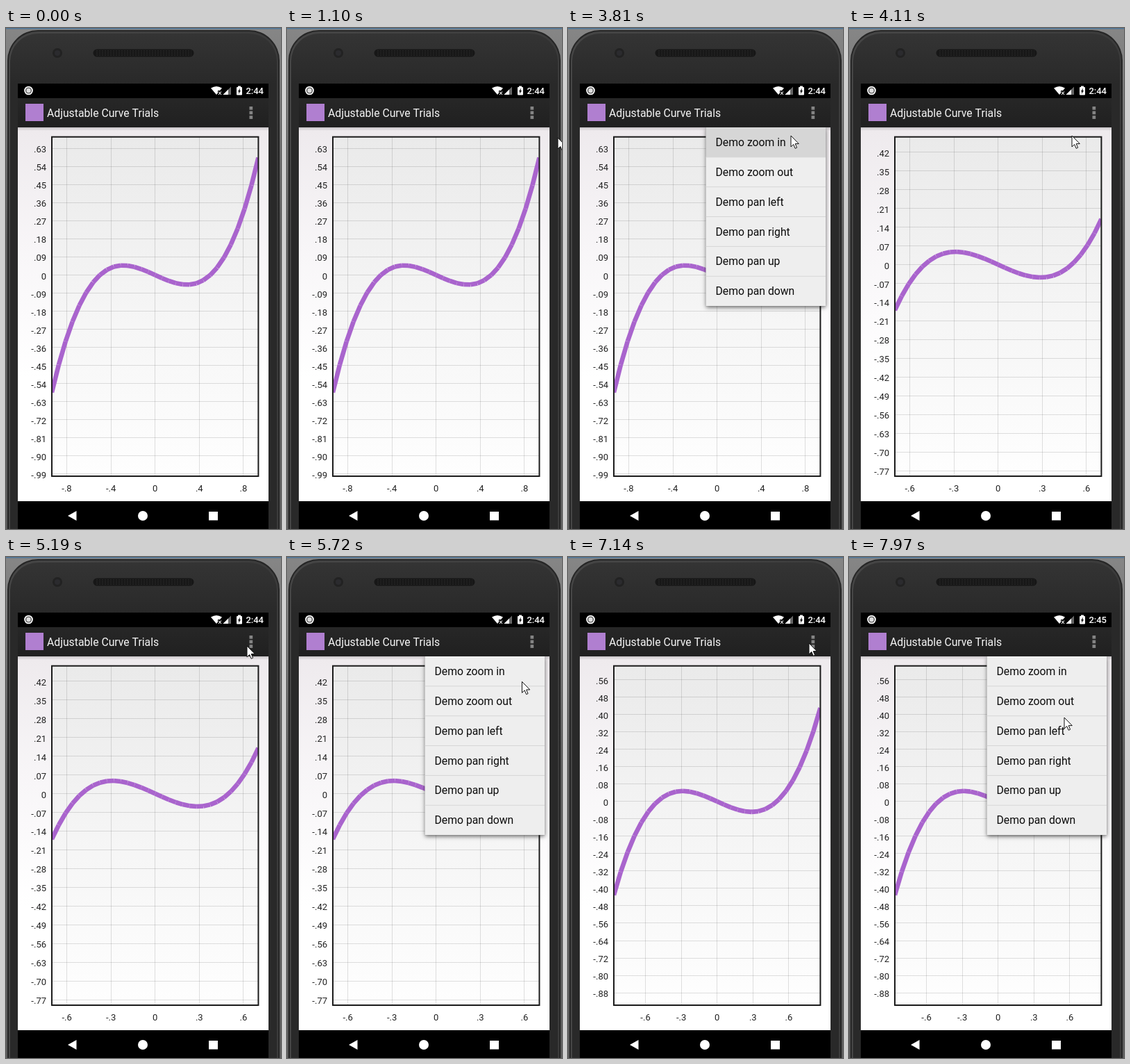
Write an HTML page with a canvas that moves like this. It is 396 by 721 pixels and loops after 8000 ms.

```html
<!DOCTYPE html>
<html lang="en">
<head>
<meta charset="utf-8">
<title>Curve viewer</title>
<style>
html, body { margin: 0; width: 100%; height: 100%; overflow: hidden; background: #6f6f6f; }
canvas { display: block; width: 396px; height: 721px; }
</style>
</head>
<body>
<canvas id="stage"></canvas>
<script>
const W = 396, H = 721, LOOP = 8000;
const canvas = document.getElementById('stage');
const ctx = canvas.getContext('2d');
const dpr = window.devicePixelRatio || 1;
canvas.width = W * dpr;
canvas.height = H * dpr;

const PLOT = { x: 66, y: 156.7, w: 297.4, h: 488.3 };
const MENU = { x: 198.5, y: 143, w: 172.5, row: 42.85 };
const ITEMS = ['zoom in', 'zoom out', 'pan left', 'pan right', 'pan up', 'pan down'];
const FONT = 'Roboto, sans-serif';

// Each visit to the menu: when it opens and closes, the row chosen, the zoom it leads to
const VISITS = [
  { open: 2496, close: 3860, row: 0, zoom: 1.3325 },
  { open: 5250, close: 6158, row: 1, zoom: 1.0815 },
  { open: 7180, close: Infinity }
];
const MENU_FADE = 150, ZOOM_TIME = 180, MOVE_TIME = 450;

// Pointer stops [arrival, x, y]; it rests at each until the next move is due
const STOPS = [
  [70, 241, 705], [430, 285, 289], [790, 400, 1000], [940, 400, 199],
  [1100, 390, 158], [1600, 350, 99], [2120, 347, 124], [2570, 347, 140],
  [3330, 321, 155], [4730, 347, 128], [5880, 335, 200], [6250, 342.5, 161],
  [6730, 347, 124], [7820, 326, 177], [7965, 310, 231]
];

const clamp = v => Math.min(1, Math.max(0, v));
const smooth = k => k * k * (3 - 2 * k);
const decelerate = k => 1 - (1 - k) ** 2;
const mix = (a, b, k) => a + (b - a) * k;
const progress = (t, start, span) => clamp((t - start) / span);

function pointerAt(t) {
  if (t < STOPS[0][0]) return null;
  let [before, x, y] = STOPS[0];
  for (const [arrival, nx, ny] of STOPS.slice(1)) {
    const start = Math.max(before, arrival - MOVE_TIME);
    const k = smooth(progress(t, start, arrival - start));
    x = mix(x, nx, k);
    y = mix(y, ny, k);
    before = arrival;
  }
  return [x, y];
}

function stateAt(t) {
  const state = { zoom: 1, alpha: 0, row: -1, button: false, pointer: pointerAt(t) };
  for (const { open, close, row, zoom } of VISITS) {
    state.alpha += progress(t, open, MENU_FADE) - progress(t, close, MENU_FADE);
    if (t > open - 290 && t < open - 140) state.button = true;
    if (t > close - 50 && t < close + MENU_FADE) state.row = row;
    if (zoom) state.zoom = mix(state.zoom, zoom, decelerate(progress(t, close + 32, ZOOM_TIME)));
  }
  return state;
}

function rect(x, y, w, h, fill) {
  ctx.fillStyle = fill;
  ctx.fillRect(x, y, w, h);
}

function round(x, y, w, h, r, fill) {
  ctx.fillStyle = fill;
  ctx.beginPath();
  ctx.roundRect(x, y, w, h, r);
  ctx.fill();
}

function disc(x, y, r, fill) {
  ctx.fillStyle = fill;
  ctx.beginPath();
  ctx.arc(x, y, r, 0, 7);
  ctx.fill();
}

function poly(points, fill, stroke) {
  ctx.beginPath();
  points.forEach(([x, y]) => ctx.lineTo(x, y));
  ctx.closePath();
  ctx.fillStyle = fill;
  ctx.fill();
  if (stroke) {
    ctx.strokeStyle = stroke;
    ctx.lineWidth = 1;
    ctx.stroke();
  }
}

function text(str, x, y, size, fill, align = 'left', weight = 400) {
  ctx.font = `${weight} ${size}px ${FONT}`;
  ctx.textAlign = align;
  ctx.fillStyle = fill;
  ctx.fillText(str, x, y);
}

function fade(x0, y0, x1, y1, ...colors) {
  const g = ctx.createLinearGradient(x0, y0, x1, y1);
  colors.forEach((c, i) => g.addColorStop(i / (colors.length - 1), c));
  return g;
}

function drawPhone() {
  rect(0, 0, W, H, fade(0, 0, 0, 300, '#868686', '#5c5c5c'));
  rect(0, 0, W, 1.5, '#4e7698');
  round(2, 3, 392, 800, 44, '#262626');
  round(4, 5, 388, 800, 42, fade(4, 0, 392, 0, '#464646', '#3b3b3b'));
  round(6, 8, 384, 800, 40, fade(0, 8, 0, 80, '#343434', '#292929'));
  disc(74, 36, 7, '#222');
  disc(74, 36, 4, '#2b2b2e');
  round(125.5, 30.5, 145, 11, 5.5, '#171717');
  ctx.save();
  ctx.setLineDash([2, 2]);
  ctx.strokeStyle = '#2c2c2c';
  ctx.lineWidth = 1;
  for (let y = 33; y < 41; y += 3) {
    ctx.beginPath();
    ctx.moveTo(130, y);
    ctx.lineTo(267, y);
    ctx.stroke();
  }
  ctx.restore();
}

function drawStatus(clock) {
  rect(17, 80, 361, 21, '#000');
  disc(32.5, 90, 6.3, '#fff');
  disc(32.5, 90, 4.6, '#555');
  disc(32.5, 90, 3.2, '#ddd');
  ctx.fillStyle = '#fff';
  ctx.beginPath();
  ctx.moveTo(303, 96);
  ctx.lineTo(295, 86.5);
  ctx.quadraticCurveTo(303, 81.5, 311, 86.5);
  ctx.fill();
  rect(305, 90, 6, 7, '#000');
  ctx.strokeStyle = '#fff';
  ctx.lineWidth = 1.1;
  ctx.beginPath();
  ctx.moveTo(306, 91.5);
  ctx.lineTo(310, 96);
  ctx.moveTo(310, 91.5);
  ctx.lineTo(306, 96);
  ctx.stroke();
  poly([[312.5, 96], [324, 96], [324, 84.5]], '#666');
  poly([[312.5, 96], [320, 96], [320, 88.5]], '#fff');
  rect(334, 83.5, 4, 2, '#fff');
  round(332, 85, 8, 11.5, 1, '#fff');
  poly([[337, 86.5], [334, 91.5], [335.5, 91.5], [335, 95], [338, 90], [336.5, 90]], '#000');
  text(clock, 371, 95, 13, '#fff', 'right', 500);
}

function drawBars(button) {
  rect(17, 101, 361, 42, fade(0, 101, 0, 143, '#272727', '#202020'));
  rect(28, 109, 26, 25, '#b07fd0');
  text('Adjustable Curve Trials', 59, 128, 15.75, '#f4f4f4');
  if (button) rect(328, 101, 50, 42, 'rgba(255,255,255,.12)');
  for (let i = 0; i < 3; i++) rect(350.5, 113 + i * 6.6, 4.7, 4.7, '#848484');

  rect(17, 681, 361, 40, '#000');
  poly([[89, 702], [101.5, 695], [101.5, 709]], '#fff');
  disc(197, 702, 7, '#fff');
  rect(292, 696, 13, 12.5, '#fff');
}

// Round-numbered axis values between two limits
function ticks(from, to, count) {
  const raw = (to - from) / count;
  const mag = 10 ** Math.floor(Math.log10(raw));
  const step = Math.round(raw / mag) * mag;
  const list = [];
  for (let i = Math.ceil(from / step); i * step <= to; i++) list.push(i * step);
  return list;
}

function label(v, digits) {
  return Math.abs(v) < 1e-6 ? '0' : v.toFixed(digits).replace('0.', '.');
}

function drawChart(zoom) {
  const { x, y, w, h } = PLOT;
  const x0 = x + w / 2, y0 = 400.5 - 45 * zoom;
  const ux = 159 * zoom, uy = 289.2 * zoom;
  const left = (x - x0) / ux, right = (x + w - x0) / ux;
  const fx = v => x0 + v * ux, fy = v => y0 - v * uy;

  rect(17, 143, 361, 538, fade(0, 143, 0, 681, '#eeeaed', '#f8f6f8', '#fff', '#fff'));
  rect(17, 143, 361, 5, fade(0, 143, 0, 148, 'rgba(0,0,0,.16)', 'rgba(0,0,0,0)'));
  rect(x, y, w, h, fade(0, y, 0, y + h, '#eaeaea', '#f5f5f5', '#fefefe'));

  for (const v of ticks(left, right, 5)) {
    rect(Math.round(fx(v) - .5), y, 1, h, 'rgba(0,0,0,.12)');
    text(label(v, 1), fx(v), 666.5, 13, '#222', 'center');
  }
  for (const v of ticks((y0 - y - h) / uy, (y0 - y) / uy, 19)) {
    rect(x, Math.round(fy(v) - .5), w, 1, 'rgba(0,0,0,.12)');
    text(label(v, 2), 58, fy(v) + 6, 13, '#222', 'right');
  }

  ctx.save();
  ctx.beginPath();
  ctx.rect(x, y, w, h);
  ctx.clip();
  ctx.strokeStyle = '#a964cd';
  ctx.lineWidth = 6.6;
  const at = i => {
    const v = mix(left, right, i / 30);
    return [fx(v), fy(v ** 3 - v / 4)];
  };
  // Separate strokes leave the small notches between segments
  for (let i = 0; i < 30; i++) {
    ctx.beginPath();
    ctx.moveTo(...at(i));
    ctx.lineTo(...at(i + 1));
    ctx.stroke();
  }
  ctx.restore();
  ctx.strokeStyle = '#1b1b1b';
  ctx.lineWidth = 2;
  ctx.strokeRect(x, y, w, h);
}

function drawMenu(alpha, pressed) {
  if (alpha <= 0) return;
  const { x, y, w, row } = MENU, h = row * ITEMS.length;
  const mid = x + w / 2, scale = .9 + .1 * alpha;
  ctx.save();
  ctx.beginPath();
  ctx.rect(17, y, 361, 500);
  ctx.clip();
  ctx.translate(mid, y - 1);
  ctx.scale(scale, scale);
  ctx.translate(-mid, 1 - y);
  ctx.globalAlpha = alpha;

  // Shadow only outside the panel, so the panel itself stays evenly translucent
  ctx.save();
  ctx.beginPath();
  ctx.rect(0, 0, W, H);
  ctx.rect(x, y, w, h);
  ctx.clip('evenodd');
  ctx.shadowColor = 'rgba(0,0,0,.6)';
  ctx.shadowBlur = 6 * dpr;
  ctx.shadowOffsetY = 2 * dpr;
  rect(x, y, w, h, '#000');
  ctx.restore();

  rect(x, y, w, h, '#eee');
  if (pressed >= 0) rect(x, y + pressed * row, w, row, 'rgba(0,0,0,.1)');
  ITEMS.forEach((item, i) => {
    if (i) rect(x, y + i * row - .5, w, 1, '#d6d6d6');
    text('Demo ' + item, 212.5, y + i * row + 27, 15.75, '#0c0c0c');
  });
  ctx.restore();
}

function drawPointer(pos) {
  if (!pos) return;
  const shape = [[0, 0], [0, 16], [3.7, 12.5], [6.2, 18.3], [8.6, 17.2], [6.2, 11.6], [11.3, 11.6]];
  poly(shape.map(([x, y]) => [pos[0] + x, pos[1] + y]), '#fff', '#111');
}

function draw(t) {
  const state = stateAt(t);
  ctx.setTransform(dpr, 0, 0, dpr, 0, 0);
  drawPhone();
  drawChart(state.zoom);
  drawStatus(t < 7500 ? '2:44' : '2:45');
  drawBars(state.button);
  drawMenu(state.alpha, state.row);
  drawPointer(state.pointer);
}

const start = performance.now();
function tick() {
  draw((performance.now() - start) % LOOP);
  requestAnimationFrame(tick);
}
tick();
</script>
</body>
</html>
```
